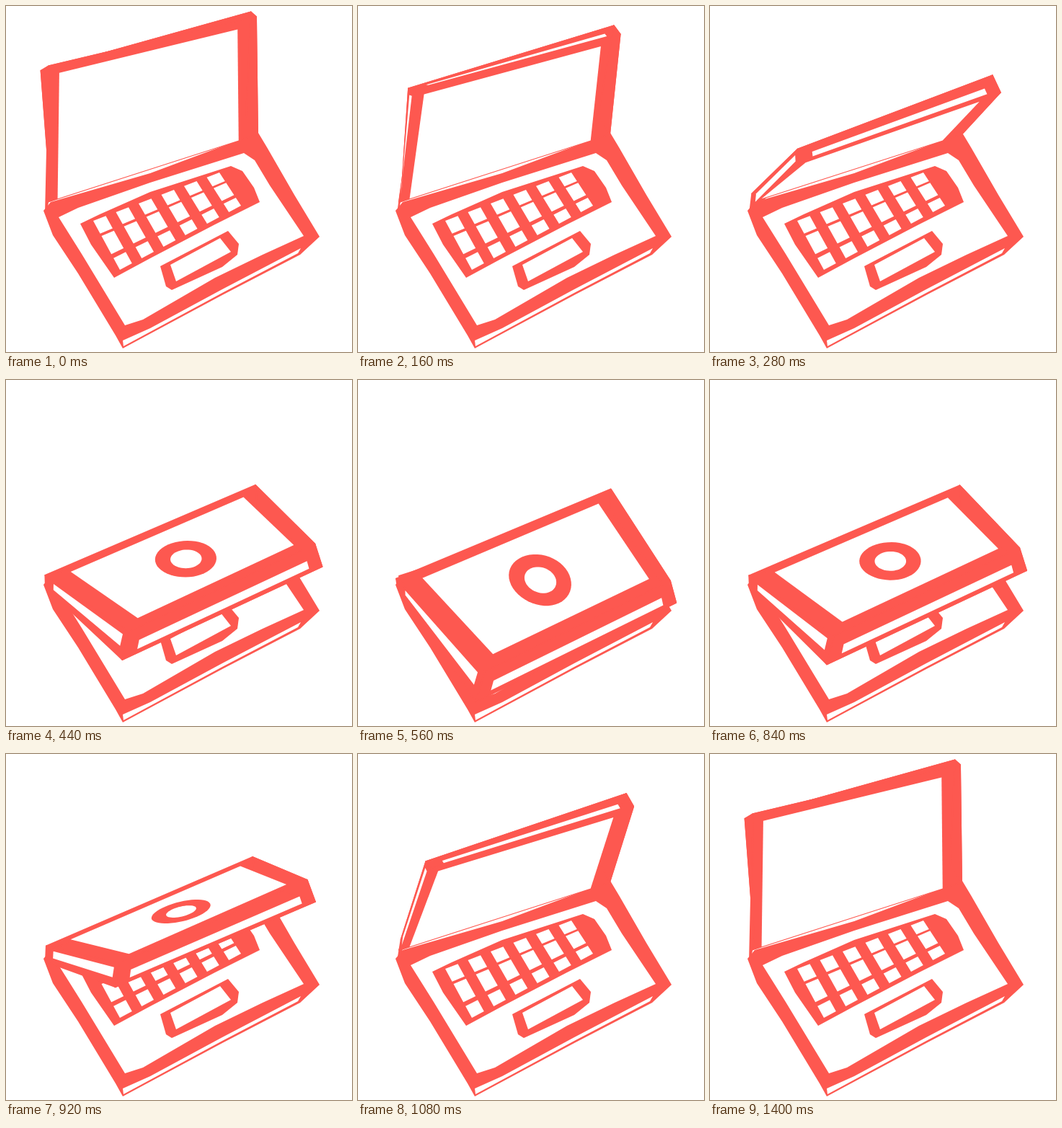
An HTML page with a canvas for the animation above (1440 ms loop, 480x480 px).

```html
<!DOCTYPE html>
<html>
<head>
<meta charset="utf-8">
<style>
html, body { margin: 0; width: 100%; height: 100%; overflow: hidden; background: #fff; }
canvas { display: block; }
</style>
</head>
<body>
<canvas id="stage" width="480" height="480"></canvas>
<script>
const LOOP = 1440, STEP = 40, OPEN = 95;
const INK = '#fd5850', PAPER = '#fff';
const ctx = document.getElementById('stage').getContext('2d');
ctx.lineJoin = 'round';
ctx.lineWidth = 2;

function shape(points, color, outlined) {
  ctx.beginPath();
  points.forEach(p => ctx.lineTo(...p));
  ctx.closePath();
  ctx.fillStyle = ctx.strokeStyle = color;
  ctx.fill();
  if (outlined) ctx.stroke();
}

const lerp = (p, q, t) => [p[0] + (q[0] - p[0]) * t, p[1] + (q[1] - p[1]) * t];

// Point of a four-cornered face: u along the first edge, v across
const at = ([a, b, c, d], u, v) => lerp(lerp(a, b, u), lerp(d, c, u), v);

const patch = (face, u0, u1, v0, v1) =>
  [at(face, u0, v0), at(face, u1, v0), at(face, u1, v1), at(face, u0, v1)];

const facesViewer = ([a, b, c, d]) =>
  (c[0] - a[0]) * (d[1] - b[1]) > (c[1] - a[1]) * (d[0] - b[0]);

const disc = (face, size) => Array.from({ length: 48 }, (_, i) => {
  const a = i / 24 * Math.PI;
  return at(face, 0.5 + 0.126 * size * Math.cos(a), 0.5 + 0.25 * size * Math.sin(a));
});

function drawBase() {
  shape([[52, 284], [62, 272], [200, 232], [350, 176], [362, 196], [400, 262], [435, 320],
    [408, 345], [300, 401], [162, 475], [152, 457], [100, 371], [65, 318]], INK);
  shape([[73, 293], [100, 280], [200, 245], [330, 204], [345, 214], [366, 249], [413, 319],
    [356, 345], [290, 377], [190, 435], [165, 443], [105, 344]], PAPER);
  shape([[162, 464], [200, 447], [300, 393], [409, 336], [405, 343], [300, 398], [163, 472]], PAPER);

  shape([[103, 302], [130, 289], [200, 258], [312, 222], [328, 229], [344, 252], [352, 272],
    [290, 303], [200, 350], [150, 377], [118, 331]], INK);
  const keys = [[121, 298], [296, 231], [326, 277], [158, 366]];
  for (const [top, bottom] of [[0, 0.26], [0.31, 0.68], [0.76, 1]])
    for (let u = 0; u < 1; u += 0.18) shape(patch(keys, u, u + 0.1, top, bottom), PAPER);

  shape([[214, 361], [308, 312], [323, 330], [321, 345], [300, 362], [230, 394], [222, 389]], INK);
  shape([[228, 359], [297, 322], [312, 341], [236, 382]], PAPER);
}

function drawLid(angle) {
  const cos = Math.cos(angle * Math.PI / 180), sin = Math.sin(angle * Math.PI / 180);
  const hingeL = [57, 272], hingeR = [349, 178], footL = [55, 288];
  // Every corner turns on an ellipse from its closed to its upright offset
  const turn = ([x, y], [cx, cy], [ux, uy]) => [x + cx * cos + ux * sin, y + cy * cos + uy * sin];
  const backL = turn(hingeL, [-4, 4], [4, -16]);
  const backR = turn(hingeR, [2, -26], [-16, -24]);
  const outerL = turn(hingeL, [119, 136], [2, -171]);
  const outerR = turn(hingeR, [84, 104], [-2, -161]);
  const innerL = turn(hingeL, [106, 178], [12, -174]);
  const innerR = turn(hingeR, [92, 134], [6, -152]);

  const cover = [backL, backR, outerR, outerL];
  const screen = [hingeL, innerL, innerR, hingeR];
  const side = [backL, outerL, innerL, footL];
  const edge = [outerL, outerR, innerR, innerL];
  const rightSide = [backR, hingeR, innerR, outerR];

  for (const face of [cover, screen, side, edge, rightSide]) shape(face, INK, true);

  if (angle < 88) {
    if (facesViewer(side)) shape(patch(side, 0.1, 0.94, 0.22, 0.65), PAPER);
    if (facesViewer(edge)) shape(patch(edge, 0.07, 0.94, 0.52, 0.85), PAPER);
  }
  if (facesViewer(screen)) shape(patch(screen, 0, 0.93, 0.05, 0.91), PAPER);
  if (facesViewer(cover)) {
    shape(patch(cover, 0.09, 0.92, 0.08, 0.9), PAPER);
    shape(disc(cover, 1), INK);
    shape(disc(cover, 0.51), PAPER);
  }
}

function ease(time, start, end) {
  const t = Math.min(1, Math.max(0, (time - start) / (end - start)));
  return (1 - Math.cos(t * Math.PI)) / 2;
}

function draw() {
  const time = Math.floor(performance.now() % LOOP / STEP) * STEP;
  ctx.fillStyle = PAPER;
  ctx.fillRect(0, 0, 480, 480);
  drawBase();
  drawLid(OPEN * (1 - ease(time, 40, 600) + ease(time, 680, 1270)));
  requestAnimationFrame(draw);
}
draw();
</script>
</body>
</html>
```
